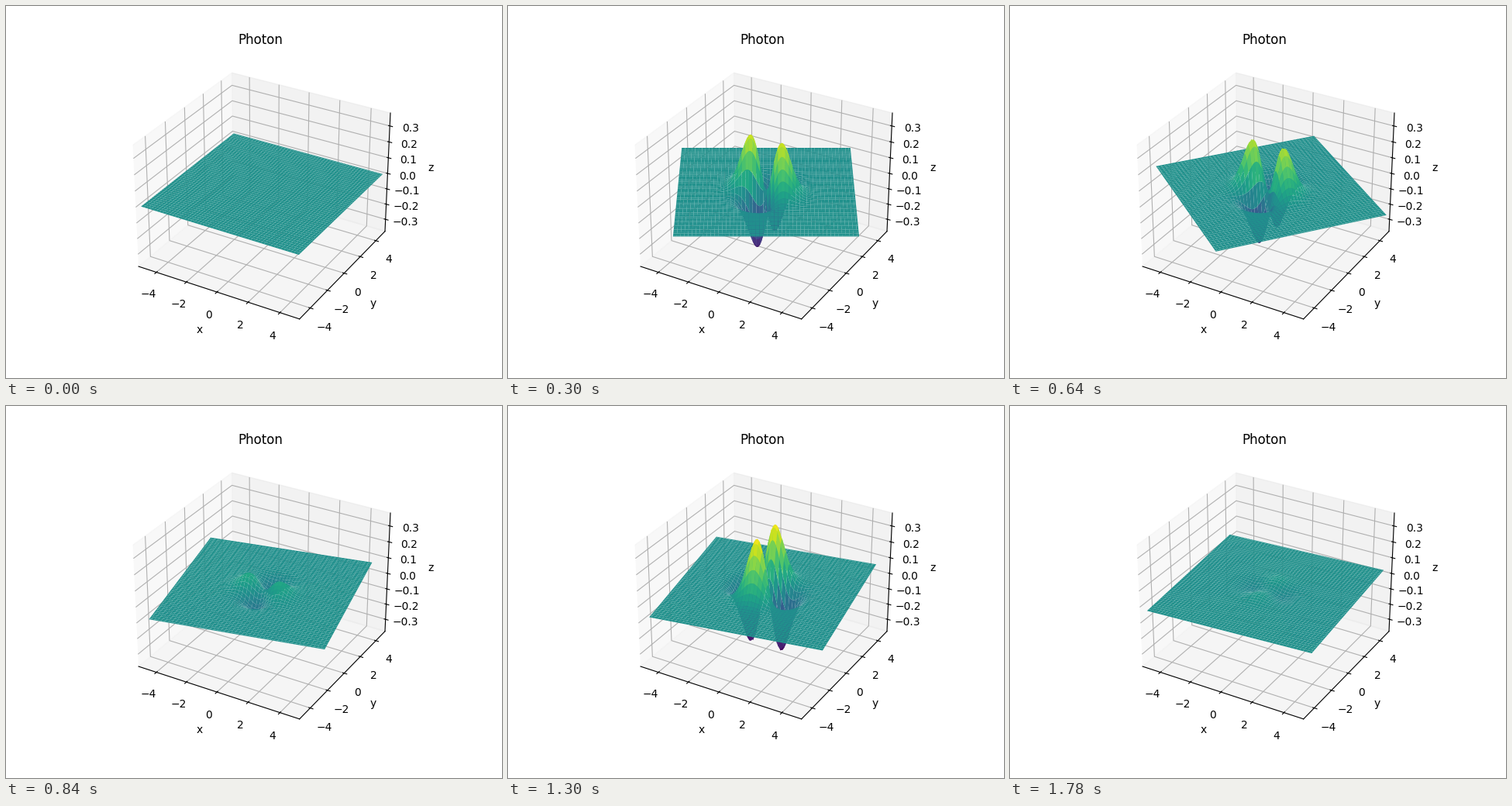
Write a matplotlib script that moves like this. It is 640x480 px and loops after 1800 ms.

```python
import numpy as np
import matplotlib.pyplot as plt
from matplotlib.animation import FuncAnimation
from mpl_toolkits.mplot3d.art3d import Poly3DCollection

FRAMES = 90
POINTS = 100
STRIDE = 2
HALF = 5

side = np.linspace(-HALF, HALF, POINTS)
gx, gy = np.meshgrid(side, side)

# Perimeter indices of every patch, clamped at the far edges.
ring = np.array([(0, 0), (0, 1), (0, 2), (1, 2), (2, 2), (2, 1), (2, 0), (1, 0)])
start = np.arange(0, POINTS - 1, STRIDE)
r0, c0 = (a.reshape(-1, 1) for a in np.meshgrid(start, start, indexing="ij"))
rows = np.minimum(r0 + ring[:, 0], POINTS - 1)
cols = np.minimum(c0 + ring[:, 1], POINTS - 1)


def wave(x, y):
    return (x**2 - y**2) * np.exp(-x**2 - y**2)


def patches(angle):
    """Patches of the grid turned clockwise, carrying a standing quadrupole wave."""
    c, s = np.cos(angle), np.sin(angle)
    x = gx * c + gy * s
    y = gy * c - gx * s
    return np.stack([x, y, s * wave(x, y)], axis=-1)[rows, cols]


fig = plt.figure(figsize=(6.4, 4.8), dpi=100)
ax = fig.add_subplot(projection="3d")

top = wave(gx, gy).max()
surface = Poly3DCollection(patches(0), cmap="viridis", linewidth=0)
surface.set_array(np.zeros(len(rows)))
surface.set_clim(-top, top)
ax.add_collection(surface)

margin = 1 / 48
ax.set_xlim(-HALF, HALF, view_margin=margin)
ax.set_ylim(-HALF, HALF, view_margin=margin)
ax.set_zlim(-top, top, view_margin=margin)
ax.set_xlabel("x")
ax.set_ylabel("y")
ax.set_zlabel("z")
ax.set_title("Photon")


def update(n):
    verts = patches(2 * np.pi * n / FRAMES)
    surface.set_verts(verts)
    surface.set_array(verts[..., 2].mean(axis=1))
    return (surface,)


anim = FuncAnimation(fig, update, frames=FRAMES, interval=20, repeat=True, blit=False)
plt.show()
```
